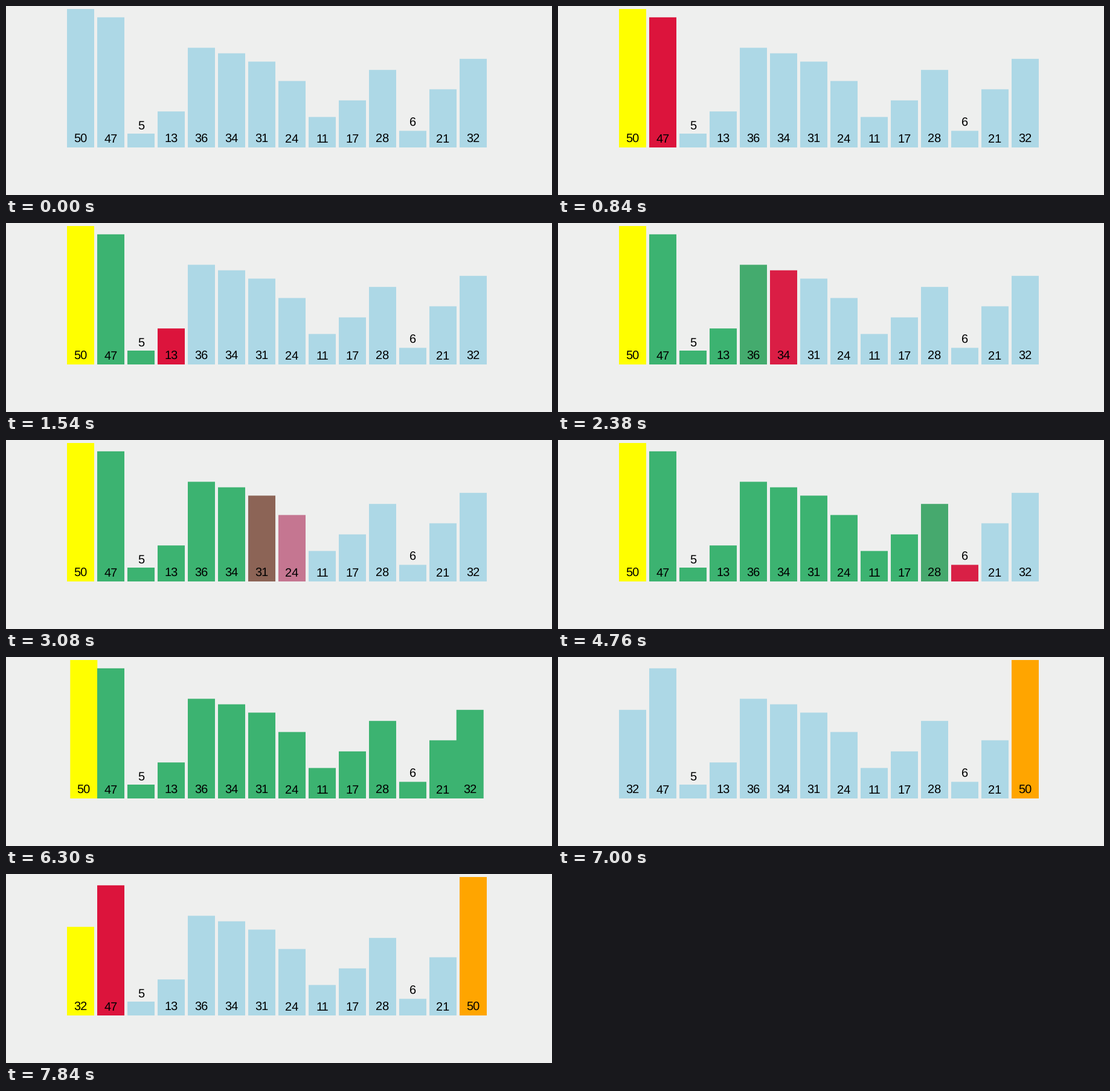
Animation of 904x314 px, one loop 8 s. Source, as a matplotlib script:

```python
import numpy as np
import matplotlib.pyplot as plt
from matplotlib.animation import FuncAnimation
from matplotlib.colors import to_rgb
from matplotlib.patches import Rectangle

WIDTH, HEIGHT, DPI = 904, 314, 64
LOOP, TICK, HOLD = 8000, 20, 140      # ms
FADE = 300                            # ms per transition

VALUES = [50, 47, 5, 13, 36, 34, 31, 24, 11, 17, 28, 6, 21, 32]
LAST = len(VALUES) - 1
LEFT, PITCH, BAR_WIDTH, FLOOR, UNIT = 101, 50, 45, 235, 4.6

IDLE, PIVOT, SCAN, SEEN, SORTED = (
    np.array(to_rgb(name))
    for name in ("lightblue", "yellow", "crimson", "mediumseagreen", "orange")
)

# Start times of the scan over bars 1 to LAST
SCAN_STARTS = [470, 830, 1170, 1670, 2150, 2510, 2930,
               3350, 3770, 4190, 4534, 5030, 5450]
SWAP_START = 6262


def partition_events():
    """Colour changes as (start time, {bar: colour})."""
    events = [(-10, {0: PIVOT})]
    for bar, start in enumerate(SCAN_STARTS, 1):
        change = {bar: SCAN}
        if bar > 1:
            change[bar - 1] = SEEN
        events.append((start, change))
    events.append((5870, {LAST: SEEN}))
    reset = {bar: IDLE for bar in range(1, LAST + 1)}
    events.append((6710, {**reset, 0: SORTED}))
    events.append((7130, {LAST: PIVOT}))
    events.append((7470, {1: SCAN}))
    return events


EVENTS = partition_events()


def ease(time, start):
    """Cubic in-out progress of a transition."""
    p = min(max((time - start) / FADE, 0), 1)
    return 4 * p**3 if p < 0.5 else 1 - 4 * (1 - p)**3


def colors_at(time):
    colors = [IDLE] * len(VALUES)
    for start, change in EVENTS:
        k = ease(time, start)
        for bar, color in change.items():
            colors[bar] = colors[bar] + (color - colors[bar]) * k
    return colors


plt.rcParams["font.family"] = "Liberation Sans"
plt.rcParams["text.hinting"] = "none"

fig = plt.figure(figsize=(WIDTH / DPI, HEIGHT / DPI), dpi=DPI, facecolor="#eeefee")
ax = fig.add_axes([0, 0, 1, 1])
ax.set(xlim=(0, WIDTH), ylim=(HEIGHT, 0))
ax.axis("off")

bars, labels = [], []
for i, value in enumerate(VALUES):
    x, height = LEFT + i * PITCH, value * UNIT
    bar = Rectangle((x, FLOOR - height), BAR_WIDTH, height, lw=0, snap=False, zorder=1)
    bars.append(ax.add_patch(bar))
    baseline = FLOOR - 8 if value > 10 else FLOOR - height - 7.5
    labels.append(ax.text(x + BAR_WIDTH / 2, baseline, str(value), ha="center",
                          va="baseline", fontsize=20 * 72 / DPI, color="black", zorder=2))


def draw(frame):
    time = min(frame * TICK // HOLD, LOOP // HOLD - 1) * HOLD
    shift = LAST * PITCH * ease(time, SWAP_START)
    for bar, color in zip(bars, colors_at(time)):
        bar.set_facecolor(color)
    for i, x in ((0, LEFT + shift), (LAST, LEFT + LAST * PITCH - shift)):
        bars[i].set_x(x)
        labels[i].set_x(x + BAR_WIDTH / 2)
    return bars + labels


anim = FuncAnimation(fig, draw, frames=LOOP // TICK, interval=TICK,
                     repeat=True, repeat_delay=0)
plt.show()
```
